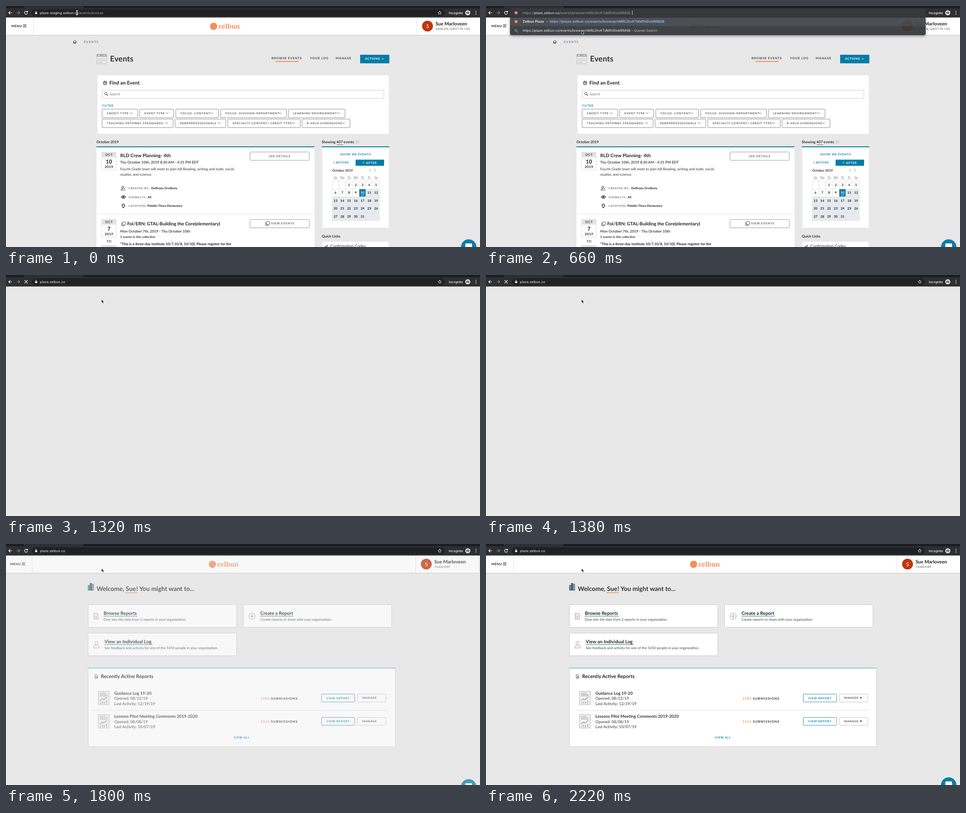
Animation, 1048 px wide and 534 px high, one loop 2.28 s. Source, as an HTML page:

```html
<!DOCTYPE html>
<html lang="en">
<head>
<meta charset="utf-8">
<title>Events to home</title>
<style>
  html, body { margin: 0; width: 100%; height: 100%; overflow: hidden; background: #e8e8e8; }
  svg { display: block; width: 1048px; height: 534px; font-family: Lato, "Open Sans", sans-serif; fill: #333; text-rendering: geometricPrecision; }
  .ui { font-family: Inter, Roboto, sans-serif; }
  .logo { font-family: "Noto Serif", serif; }
  .b { font-weight: 700; }
  .line { fill: none; stroke-linecap: round; stroke-linejoin: round; }
</style>
</head>
<body>
<svg id="stage" viewBox="0 0 1048 534"></svg>
<script>
const BLUE = '#047da5', ORANGE = '#f0905f', GREY = '#9aa0a6', LIGHT = '#e8eaed';
const LOOP = 2280, STEP = 60;
const HOST = 'plaze.zelbun.co', PATH = '/events/browse/nMRLGtvKTdMfhlDsbRlMSB';

// Drawing helpers
const text = (x, y, s, size, attrs = '') => `<text x="${x}" y="${y}" font-size="${size}" ${attrs}>${s}</text>`;
const bold = (x, y, s, size, attrs = '') => text(x, y, s, size, `class="b" ${attrs}`);
const caps = (x, y, s, size = 6.9, color = '#444', gap = .8, attrs = '') =>
  bold(x, y, s, size, `fill="${color}" letter-spacing="${gap}" ${attrs}`);
const mid = 'text-anchor="middle"';
const rect = (x, y, w, h, fill, stroke = 'none', rx = 0) =>
  `<rect x="${x}" y="${y}" width="${w}" height="${h}" fill="${fill}" stroke="${stroke}" rx="${rx}"/>`;
const circle = (x, y, r, fill, stroke = 'none') => `<circle cx="${x}" cy="${y}" r="${r}" fill="${fill}" stroke="${stroke}"/>`;
const path = (d, color = '#333', width = 1) => `<path class="line" d="${d}" stroke="${color}" stroke-width="${width}"/>`;
const down = (x, y, c = '#555') => path(`M${x - 2.5} ${y - 1.2}l2.5 2.5 2.5-2.5`, c);
const side = (x, y, dir, c, r = 2) => path(`M${x - dir * r / 2} ${y - r}l${dir * r} ${r} ${-dir * r} ${r}`, c);
const lens = (x, y, c, r = 2.6) => circle(x - .8, y - .8, r, 'none', c) + path(`M${x + 1.2} ${y + 1.2}l2.3 2.3`, c, 1.2);
const group = (id, body, attrs = '') => `<g id="${id}" ${attrs}>${body}</g>`;

const header = place =>
  rect(0, 25, 1048, 39, '#fff') + path('M0 64.5H1048', '#c2c2c2') + path('M60.5 26V63M908.5 26V63', '#e2e2e2') +
  caps(12, 46.6, 'MENU', 7.2, '#222', .4) + path('M38 41.5h6.5M38 44h6.5M38 46.5h6.5', '#222', 1.1) +
  circle(459, 45, 8, ORANGE) + text(469, 50, 'zelbun', 14, `class="logo b" fill="${ORANGE}"`) +
  circle(932, 44.5, 12, '#bf360c') + text(932, 48.6, 'S', 11.5, `${mid} fill="#fff"`) +
  bold(949.7, 43, 'Sue Marloveen', 10.5, 'fill="#222"') +
  text(950, 53, place, 6.3, 'letter-spacing=".9" fill="#444"');

const filters = [
  [212, 292, 'CREDIT TYPE'], [295, 371, 'EVENT TYPE'], [375, 470, 'FOCUS: CONTENT'],
  [474, 621, 'FOCUS: DIVISION/DEPARTMENT'], [624, 750, 'LEARNING ENVIRONMENT'],
  [212, 370, 'TEACHING PATHWAY STANDARDS'], [373.5, 486.5, 'PARAPROFESSIONALS'],
  [490, 651, 'SPECIALTY CONTENT/ CREDIT TYPE'], [654, 761, 'R-VALD DIMENSIONS']
].map(([x, end, label], i) => {
  const y = i < 5 ? 228.5 : 250.5;
  return rect(x + .5, y, end - x - 1, 19, '#fff', '#8c8c8c', 1.5) + caps(x + 11, y + 11.2, label, 6.3, '#555', .85) + down(end - 15, y + 9);
}).join('');

const dateBox = (y, day) =>
  rect(211.5, y, 32, 39, '#fff', '#dcdcdc') + rect(211, y, 33, 11.5, '#e2e2e2') +
  caps(228, y + 8.4, 'OCT', 7, '#333', .8, mid) + bold(227.5, y + 25, day, 12, `${mid} fill="#222"`) +
  caps(227.8, y + 34.8, '2019', 7.5, '#222', .4, mid);

const copies = (x, y) => rect(x - 2.5, y - 4, 6.5, 6.5, 'none', '#444', 1) + path(`M${x - 4.5} ${y - 2}v6.5h6.5`, '#444');

function calendar() {
  const x0 = 721, y0 = 388, w = 14.95, h = 17.5;
  let out = ['Su', 'Mo', 'Tu', 'We', 'Th', 'Fr', 'Sa'].map((d, i) => {
    const x = x0 + (i + .5) * w;
    return text(x, 381.5, d, 6.6, `${mid} fill="#777"`) + path(`M${x - 4} 383.5h8`, '#999', .7);
  }).join('');
  for (let cell = 0; cell < 35; cell++) {
    const day = cell - 1, x = x0 + cell % 7 * w, y = y0 + Math.floor(cell / 7) * h, today = day === 10;
    out += rect(x, y, w, h, today ? BLUE : day > 10 ? '#e6ebef' : '#fff', day > 10 ? '#e0e6ea' : '#e4e4e4');
    if (day > 0 && day < 32) out += bold(x + w / 2, y + 10.8, day, 7.3, `${mid} fill="${today ? '#fff' : '#222'}"`);
    if (today) out += path(`M${x + 4} ${y + 13.5}h7`, '#fff', .8);
  }
  return out;
}

const eventsPage = header('VARLEN GROTTE ISD') +
  path('M148.5 79.5l3.5-3.3 3.5 3.3M149.5 79v4h1.7v-2.3h1.6v2.3h1.7v-4', '#333') +
  text(172, 82.2, 'EVENTS', 7, 'letter-spacing="1.2" fill="#666"') +
  rect(201, 107, 21, 21, '#eee', '#b5b5b5') + rect(200.5, 106.5, 22, 6, '#adadad') + circle(205.5, 109.5, 1.3, '#eee') + circle(217, 109.5, 1.3, '#eee') +
  path('M204 117h15M204 121h15M204 125h10', '#c4c4c4', 1.6) +
  bold(230, 123, 'Events', 17.4) +
  caps(587, 118.3, 'BROWSE EVENTS') + rect(595, 122, 52, 2, ORANGE) + caps(672, 118.3, 'YOUR LOG') + caps(729, 118.3, 'MANAGE') +
  rect(783, 108, 64.5, 19, BLUE, 'none', 1) + caps(794, 119.3, 'ACTIONS', 6.6, '#fff', .6) + down(833, 117, '#fff') +
  rect(201.5, 153, 645.5, 131, '#fff', '#e2e2e2') +
  rect(215.5, 167.5, 7, 7, '#fff', '#222', 1) + path('M215.5 169.5h7M217.3 166v1.5M220.7 166v1.5M217.5 172h3', '#222', 1.2) +
  bold(228.5, 174, 'Find an Event', 11.1, 'fill="#222"') +
  rect(212.5, 186.5, 623, 18, '#fff', '#cfcfcf') + lens(221.5, 194.8, '#444') + text(229, 197.9, 'Search', 8, 'fill="#777"') +
  caps(213, 223.2, 'FILTER', 6.4, BLUE) + filters +
  bold(200, 304.2, 'October 2019', 7.9) +
  rect(200, 312, 482, 222, '#fff') + rect(200, 311, 482, 2, BLUE) +
  dateBox(324, 10) + bold(252.5, 335, 'RLD Crew Planning- 4th', 10.45, 'fill="#222"') +
  bold(252.5, 349, 'Thu October 10th, 2019 8:30 AM - 4:31 PM EDT', 8, 'fill="#444"') +
  text(252.5, 364, 'Fourth Grade team will meet to plan AB Reading, writing and math, social', 7.88) +
  text(252.5, 376, 'studies, and science.', 7.88) +
  circle(258, 401.5, 2.2, 'none', '#222') + path('M254.5 408v-1.2q0-2 3.5-2M254.5 408h5M260 406l4-3.5M261 408h3') +
  caps(271, 405.8, 'CREATED BY:', 6.1, '#666') + bold(321, 406, 'Delfinata Orvillesta', 6.7, 'fill="#222"') +
  path('M254.8 423.3q4.7-6.5 9.4 0q-4.7 6.5-9.4 0', '#222', 1.2) + circle(259.5, 423.3, 1.8, '#222') +
  caps(271, 425.5, 'VISIBILITY:', 6.1, '#666') + bold(313, 425.8, 'All', 6.8, 'fill="#222"') +
  path('M259.5 447.5q-3-4-3-6a3 3 0 0 1 6 0q0 2-3 6', '#222', 1.2) + circle(259.5, 441.5, 1, '#222') +
  caps(271, 445, 'LOCATION:', 6.1, '#666') + bold(312.5, 445.2, 'Pebblin Thorn Elementary', 6.75, 'fill="#222"') +
  rect(539.5, 323.5, 131, 18.5, '#fff', '#9a9a9a', 1.5) + caps(605.4, 335.2, 'SEE DETAILS', 6.3, '#555', .9, mid) +
  '<path d="M201 461.5H682" stroke="#cfcfcf" stroke-dasharray="1.5 1.5"/>' +
  dateBox(473, 7) + caps(228, 523.8, 'TO', 7, '#333', .6, mid) + dateBox(530.5, 10) +
  copies(260, 482.5) + bold(268, 486, 'Fol/ERN: GTAL-Building the Core(elementary)', 10.15, 'fill="#222"') +
  bold(252.5, 501.8, 'Mon October 7th, 2019 - Thu October 10th', 8, 'fill="#444"') +
  bold(252.5, 514.4, '3 events in this collection', 6.9) +
  bold(252.5, 529.8, '*This is a three-day institute 10/7,10/8, 10/10). Please register for the', 7.9, 'fill="#222"') +
  rect(539.5, 473, 131, 18.5, '#fff', '#9a9a9a', 1.5) + copies(578.5, 481.7) + caps(586, 484.3, 'VIEW EVENTS', 6.3, '#555', .9) +
  bold(698, 304.2, 'Showing 407 events', 8) + path('M732 307.5h13', '#555', .9) +
  path('M775 298v6.5l-1.4-1.5M778 299h3M778 301.2h2M778 303.4h1', '#999', .8) +
  rect(699, 312, 148, 180, '#fff', '#e6e6e6') + rect(698.5, 311, 149, 2, BLUE) +
  caps(739, 331.2, 'SHOW ME EVENTS', 6.5, BLUE, .7) +
  side(725.5, 347, -1, BLUE) + caps(730, 349.3, 'BEFORE', 6.4, BLUE) +
  rect(773, 340.5, 63, 13.5, BLUE) + side(790.5, 347, 1, '#fff') + caps(796, 349.5, 'AFTER', 6.6, '#fff') +
  bold(721, 367.2, 'October 2019', 7.35) + side(805, 364, -1, '#888', 3) + side(816, 364, 1, '#888', 3) +
  calendar() +
  bold(698, 513, 'Quick Links', 8) + rect(699, 521.5, 148, 30, '#fff', '#dedede') +
  path('M705 532.5l2 2 4.5-4.5', '#222', 1.2) + text(717, 535.4, 'Confirmation Codes', 8.95);

const sheet = (x, y, c) => path(`M${x - 4.5} ${y - 6.5}h6l3 3v10h-9zM${x - 2} ${y - 1}h4M${x - 2} ${y + 1.5}h4M${x - 2} ${y + 4}h4`, c, 1.1);
const card = (x, y, tx, end, title, note) =>
  rect(x + .5, y + .5, 328, 50, '#fff', '#c9c9c9', 1) +
  bold(tx, y + 23, title, 10.4, 'fill="#222"') + path(`M${tx} ${y + 25.8}H${end}`, '#3d8fa8', 1.2) +
  text(tx, y + 35.8, note, 7.76, 'fill="#444"');

const reports = [
  ['Guidance Log 19-20', '08/12/19', '12/19/19', 1985],
  ['Lessons Pilot Meeting Comments 2019-2020', '08/08/19', '10/07/19', 2165]
].map(r => ({ title: r[0], opened: r[1], active: r[2], count: r[3] }));

const reportInfo = (r, i) => `<g transform="translate(0 ${i * 51.7})">` +
  rect(207, 326.5, 23.5, 29.5, '#f4f4f4', '#a9a9a9') + path('M210.5 330.5h12M210.5 333.5h16M210.5 336.5h16', '#aaa', 1.3) +
  path('M210.5 347l4.5-4 4 2 7-5.5M212 353v-2M216 353v-4M220 353v-3M225 353v-6', '#999', 1.6) +
  bold(242, 333.5, r.title, 9.2) + text(242, 345, 'Opened: ' + r.opened, 8.8) + text(242, 356.7, 'Last Activity: ' + r.active, 8.8) + '</g>';

const reportTools = (r, i) => `<g transform="translate(0 ${i * 51.7})">` +
  caps(567, 344.7, r.count, 7.2, ORANGE, 1) + caps(590, 344.7, 'SUBMISSIONS', 7.2, '#333', 1) +
  rect(701.5, 332.5, 73.5, 17.5, '#fff', '#3c8fac', 1.5) + caps(712.5, 343.5, 'VIEW REPORT', 6.3, BLUE, .85) +
  rect(781, 332.5, 63, 17.5, '#fff', '#c4c4c4', 1.5) + caps(792, 343.4, 'MANAGE', 6.2, '#444') +
  '<path class="caret" d="M826 339.5h5.4l-2.7 3.2z"/></g>';

const homePage = header('TANDORF') +
  rect(184.5, 91.5, 3.4, 11, '#5ba3bd', '#33566e') + rect(188.6, 87, 3.4, 15.5, '#3b7c9c', '#33566e') + rect(192.7, 89, 3.4, 13.5, '#e39b78', '#33566e') +
  bold(203, 103.5, 'Welcome,', 13.8) + bold(267.5, 103.5, 'Sue', 13.8) + bold(290.8, 103.5, '! You might want to...', 13.8) +
  path('M267 107.8h26', ORANGE, 1.4) +
  card(184, 134, 218.5, 293, 'Browse Reports', 'Dive into the data from 2 reports in your organization.') + sheet(202, 160, '#999') +
  card(527, 134, 565, 638, 'Create a Report', 'Create reports to share with your organization.') +
  circle(546.5, 160, 6.8, 'none', '#999') + path('M543 160h7M546.5 156.5v7', '#999', 1.2) +
  card(184, 197, 220.5, 326, 'View an Individual Log', 'See feedback and activity for one of the 5450 people in your organization.') +
  circle(202.5, 219, 3.6, 'none', '#999') + path('M196.5 230v-2.5q0-3 3-3h6q3 0 3 3v2.5z', '#999') +
  rect(184.5, 275, 679, 174, '#fff', '#cfcfcf') + rect(184, 274, 680, 2, '#8fc6d8') +
  '<g transform="translate(202.5 293.5) scale(.62)">' + sheet(0, 0, '#222') + '</g>' +
  bold(212.5, 297, 'Recently Active Reports', 10.95, 'fill="#222"') +
  path('M196 368.5H848', '#e0e0e0') + reports.map(reportInfo).join('') +
  group('tools', reports.map(reportTools).join('')) + caps(506, 431.2, 'VIEW ALL', 6.4, BLUE);

const chat = circle(1023, 534, 17, BLUE) + rect(1015.5, 526, 15, 12, '#fff', 'none', 2);

// Browser chrome
const url = (id, host, rest, x = 75) => group(id, text(x, 17.6, `${host}<tspan fill="${GREY}">${rest}</tspan>`, 7.5, `fill="${LIGHT}"`));
const toolbar = rect(0, 0, 1048, 25.5, '#2d2f33') + rect(0, 0, 1048, 5, '#1c1d20') + rect(39, 0, 133, 5.5, '#2d2f33', 'none', 2) +
  rect(57, 7.5, 913, 15, '#202124', 'none', 7.5) +
  path('M13 15H6M9 12l-3 3 3 3', '#fff', 1.2) + path('M23.5 15h7M27.5 12l3 3-3 3', '#85888c', 1.2) +
  group('reload', path('M47 12.7a3.4 3.4 0 1 0 .6 3.3M47.7 11v2.5h-2.6', '#fff', 1.2)) +
  group('stop', path('M41.5 12l6 6M47.5 12l-6 6', '#fff', 1.2)) +
  path('M959 11.3l1.1 2.5 2.7.2-2 1.8.6 2.6-2.4-1.4-2.4 1.4.6-2.6-2-1.8 2.7-.2z', '#dadce0', .9) +
  text(979, 17.6, 'Incognito', 7, `fill="#fff" font-weight="500"`) +
  circle(1021, 15, 5.6, '#e8eaed') + path('M1017.5 14.6h7M1019 13h4', '#333', 1.2) + circle(1019.3, 16.8, 1.1, '#333') + circle(1022.7, 16.8, 1.1, '#333') +
  [11.8, 15, 18.2].map(y => circle(1039, y, .95, '#e8eaed')).join('') +
  group('ring', rect(57.5, 7.5, 912, 15, 'none', '#46749f', 7.5)) +
  group('lock', rect(64.2, 14, 4.8, 4, '#dadce0', 'none', .6) + path('M65.2 14v-1.2a1.4 1.4 0 0 1 2.8 0V14', '#dadce0', .9)) +
  group('info', circle(66.5, 15, 3.4, 'none', '#dadce0') + path('M66.5 14.8v2M66.5 13v.1', '#dadce0')) +
  group('marked', rect(75, 10, 142.5, 10, '#3e6ca8')) +
  url('urlStart', 'plaze-staging.zelbun.co', '/events/browse') + url('urlOpen', HOST, PATH) + url('urlHome', HOST, '');

const menu = rect(53, 25, 919, 39.5, '#36393d', 'none', 4) + rect(53, 25, 919, 19.5, '#43474c') +
  circle(66.5, 34.5, 3.2, ORANGE) + text(81, 37.2, 'Zelbun Plaze', 7.6, 'font-weight="600" fill="#e8eaed"') +
  text(134, 37.2, '-', 7.6, 'fill="#e8eaed"') + text(140.5, 37.2, `https://${HOST}${PATH}`, 7.75, 'font-weight="600" fill="#8ab4f8"') +
  lens(66.5, 54.5, GREY, 2) + text(81, 57, `https://${HOST}${PATH}<tspan fill="#b4b8bd"> – Quovel Search</tspan>`, 7.5, `fill="${LIGHT}"`);

const entry = rect(53, 5, 919, 20.5, '#35383c', 'none', 4) + circle(66.5, 15, 3.2, ORANGE) +
  text(81, 17.6, `https://<tspan fill="#e8eaed">${HOST}</tspan>${PATH}`, 7.5, `fill="${GREY}"`) + path('M323.6 10.5v9', '#e8eaed', .8);

document.getElementById('stage').innerHTML =
  rect(0, 0, 1048, 534, '#e8e8e8') +
  group('events', eventsPage + chat) + group('home', homePage) + group('bubble', chat) +
  group('menu', menu, 'opacity=".95" style="filter:drop-shadow(0 2px 3px #0006)"') +
  group('chrome', toolbar, 'class="ui"') + group('entry', entry, 'class="ui"') +
  group('arrow', '<path d="M0 0v7.6l1.8-1.6 1.3 2.9 1.4-.6-1.3-2.8h2.5z" fill="#111" stroke="#fff" stroke-width=".6"/>') +
  group('beam', path('M-1.8-4.5q1.8 0 1.8 1v7q0 1-1.8 1M1.8-4.5q-1.8 0-1.8 1M1.8 4.5q-1.8 0-1.8-1', '#fff', 1.3));

const el = id => document.getElementById(id);
el('menu').classList.add('ui');
const show = (id, on) => el(id).setAttribute('visibility', on ? 'visible' : 'hidden');
const move = (id, x, y) => el(id).setAttribute('transform', `translate(${x} ${y})`);
const fade = (id, v) => el(id).setAttribute('opacity', v);
const ramp = (t, from, to) => Math.min(1, Math.max(0, (t - from) / (to - from)));

function draw(t) {
  const between = (a, b) => t >= a && t < b;
  const marked = between(60, 540), loading = between(1080, 1560);
  show('marked', marked); show('ring', marked);
  show('entry', between(540, 1080)); show('menu', between(600, 1140));
  show('reload', !loading); show('stop', loading);
  show('urlStart', t < 540); show('urlOpen', between(1080, 1320)); show('urlHome', t >= 1320);
  show('info', between(1080, 1320)); show('lock', t < 540 || t >= 1320);

  const glide = ramp(t, 60, 360), eased = glide * glide * (3 - 2 * glide);
  const x = 157 + 54.3 * eased, y = 15 + 39.3 * eased;
  show('beam', y < 25); show('arrow', y >= 25);
  move('beam', x, y); move('arrow', x, y);

  fade('events', 1 - ramp(t, 1140, 1320));
  const enter = 1 - (1 - ramp(t, 1500, 2100)) ** 1.8, left = 1 - enter;
  fade('home', enter); move('home', -9.5 * left, 0);
  fade('bubble', enter); move('bubble', 0, 14 * left);
  const ready = t >= 1920;
  move('tools', ready ? 0 : -1.2, 0);
  document.querySelectorAll('.caret').forEach(c => c.setAttribute('opacity', ready ? 1 : 0));
}

const start = performance.now();
function tick() {
  const t = (performance.now() - start) % LOOP;
  draw(Math.floor(t / STEP) * STEP);
  requestAnimationFrame(tick);
}
tick();
</script>
</body>
</html>
```
